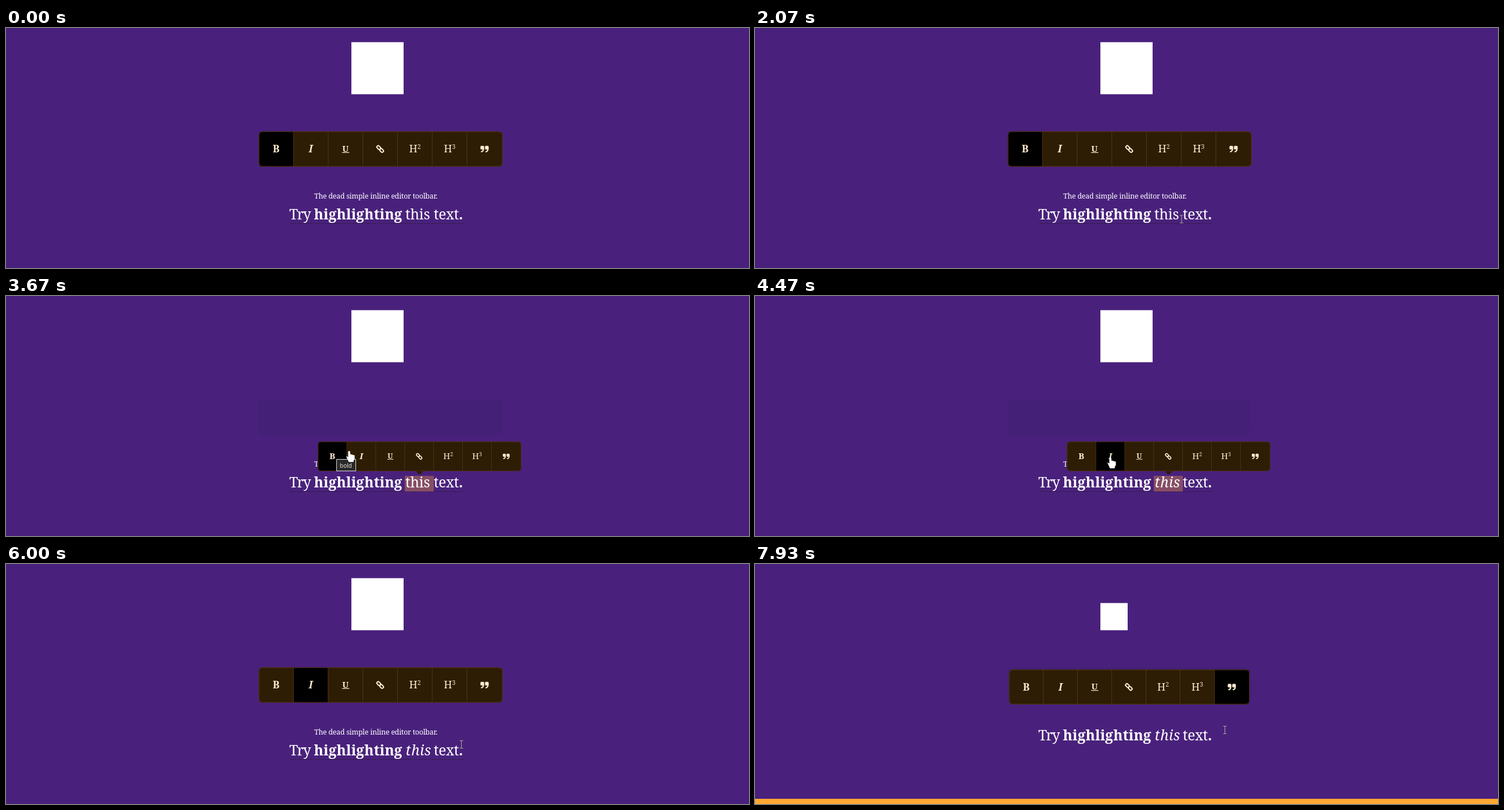
Animation of 1280 by 415 pixels, one loop 8000 ms. Source, as an HTML page with a canvas:

```html
<!DOCTYPE html>
<html lang="en">
<head>
<meta charset="utf-8">
<title>Inline editor toolbar</title>
<style>
  html, body { margin: 0; width: 100%; height: 100%; overflow: hidden; background: #49217c; }
  canvas { display: block; }
</style>
</head>
<body>
<canvas id="stage" width="1280" height="415"></canvas>
<script>
const c = document.getElementById('stage').getContext('2d');
const LOOP = 8000, STEP = 1000 / 15;
const CREAM = '#ffebcd', BAR = '#2d1d05', EDGE = '#583510', BG = '#49217c';
const SERIF = '"Noto Serif", serif';

// Moments at which something happens
const AT = {
  pickWord: 2600, italic: 4400, collapse: 5300, caretOff: 5530,
  pickLine: 6470, quote: 6950, deselect: 7600
};

const HOME = [645.5, 209.25, 1];
const OVER_WORD = [712.5, 277.25, 0.834];
const OVER_LINE = [638, 277.25, 0.834];
const OVER_QUOTE = [638, 251, 0.834];
// start, end, from, to
const MOVES = [
  [3070, 3400, HOME, OVER_WORD],
  [5500, 5830, OVER_WORD, HOME],
  [6500, 6800, HOME, OVER_LINE],
  [6950, 7080, OVER_LINE, OVER_QUOTE],
  [7640, 8050, OVER_QUOTE, HOME]
];

const MARK = [[270, 90], [1070, 50], [1930, 83], [2070, 90], [7600, 90], [7930, 47]];
const POINTER = [
  [1530, 1059, 412], [1930, 742, 335], [2400, 707, 313], [3020, 707, 313],
  [3550, 591, 269], [3950, 591, 269], [4250, 612, 280], [4650, 612, 280],
  [5200, 796.5, 320], [5600, 796.5, 320], [6000, 784.5, 312], [6450, 784.5, 312],
  [6850, 788, 278], [7200, 788, 255], [7600, 788, 255], [7900, 809.5, 287]
];

const clamp = v => Math.max(0, Math.min(1, v));
const smooth = v => v * v * (3 - 2 * v);
const easeOut = v => 1 - (1 - v) ** 2;
const mix = (a, b, p) => a.map((v, i) => v + (b[i] - v) * p);
const within = (t, a, b) => t >= a && t < b;

function follow(keys, t) {
  let i = 0;
  while (i < keys.length - 2 && t >= keys[i + 1][0]) i++;
  const [a, b] = [keys[i], keys[i + 1]];
  return mix(a, b, smooth(clamp((t - a[0]) / (b[0] - a[0])))).slice(1);
}

function text(str, x, y, font, color = '#fff', spacing = 0, align = 'left') {
  c.font = font;
  c.fillStyle = color;
  c.letterSpacing = spacing + 'px';
  c.textAlign = align;
  c.fillText(str, x, y);
}

function box(x, y, w, h, r, fill) {
  c.beginPath();
  c.roundRect(x, y, w, h, r);
  c.fillStyle = fill;
  c.fill();
}

function drawMark(t) {
  const [s] = follow(MARK, t);
  c.fillStyle = '#fff';
  c.fillRect(595, 114.5 - s, s, s);
}

function linkIcon(x) {
  c.save();
  c.translate(x, 0);
  c.rotate(Math.PI / 4);
  c.strokeStyle = CREAM;
  c.lineWidth = 2;
  for (const dx of [-7, 0]) {
    c.beginPath();
    c.roundRect(dx, -2.3, 7, 4.6, 2);
    c.stroke();
  }
  c.restore();
}

function quoteIcon(x) {
  c.strokeStyle = CREAM;
  c.lineWidth = 2.2;
  for (const dx of [x - 7, x + 0.8]) {
    box(dx, -5.5, 6.3, 6.3, 1.6, CREAM);
    c.beginPath();
    c.moveTo(dx + 5.2, -1);
    c.quadraticCurveTo(dx + 5.2, 4.6, dx + 1, 4.8);
    c.stroke();
  }
}

function heading(level, x) {
  text('H', x - 10, 6, '500 18px ' + SERIF, CREAM);
  text(level, x + 4.4, -0.5, '500 10.5px ' + SERIF, CREAM);
}

function drawBar([x, y, scale], active, arrow) {
  const cell = 59.75, left = -210, top = -30.5;
  const mid = i => left + cell * (i + 0.5);
  c.save();
  c.translate(x, y);
  c.scale(scale, scale);
  if (arrow) {
    c.fillStyle = BAR;
    c.beginPath();
    c.moveTo(-9, 30);
    c.lineTo(9, 30);
    c.lineTo(0, 38);
    c.fill();
  }
  box(left, top, 420, 61, 6, BAR);
  c.save();
  c.clip();
  c.fillStyle = '#000';
  c.fillRect(left + cell * active, top, active === 6 ? 62 : cell, 61);
  c.restore();
  c.strokeStyle = EDGE;
  c.lineWidth = 1;
  c.beginPath();
  c.roundRect(left + 0.5, top + 0.5, 419, 60, 6);
  for (let i = 1; i < 7; i++) {
    c.moveTo(left + cell * i, top);
    c.lineTo(left + cell * i, -top);
  }
  c.stroke();
  text('B', mid(0), 6, 'bold 17.5px ' + SERIF, CREAM, 0, 'center');
  text('I', mid(1), 6, 'italic bold 17.5px ' + SERIF, CREAM, 0, 'center');
  text('U', mid(2), 4.5, 'bold 15px ' + SERIF, CREAM, 0, 'center');
  c.fillRect(mid(2) - 6, 5.5, 12.5, 1.2);
  linkIcon(mid(3));
  heading('2', mid(4));
  heading('3', mid(5));
  quoteIcon(mid(6) + 0.5);
  c.restore();
}

function drawText(t) {
  const quoted = t >= AT.quote;
  const y = quoted ? 304.5 : 331;
  const size = '24.5px ' + SERIF;
  const put = (str, x, spacing, style = '') => text(str, x, y, style + size, '#fff', spacing);
  if (!quoted) {
    text('The dead simple inline editor toolbar.', 531, 294.5, '500 12.4px ' + SERIF, '#fff', -0.22);
    c.fillStyle = '#3a1c58';
    c.fillRect(488, 337.5, 300, 1.2);
  }
  c.fillStyle = '#864e64';
  if (within(t, AT.pickWord, AT.collapse)) c.fillRect(687, 311, 50, 27);
  if (within(t, AT.pickLine, AT.deselect)) c.fillRect(488, y - 20, 300, 27);
  put('Try', 488, -1.4);
  put('highlighting', 530.5, 0.1, 'bold ');
  if (t >= AT.italic) put('this', 688.5, 0.4, 'italic ');
  else put('this', 688, -0.2);
  put('text', 737, -0.4);
  put('.', 780, 0, 'bold ');
  if (within(t, AT.collapse, AT.caretOff)) c.fillRect(780, 311, 1, 27);
}

function iBeam(x, y) {
  c.strokeStyle = '#aaaa92';
  c.lineWidth = 1;
  c.beginPath();
  for (const s of [-1, 1]) {
    c.moveTo(x - 3, y + 6.5 * s);
    c.lineTo(x + 3, y + 6.5 * s);
  }
  c.moveTo(x, y - 6.5);
  c.lineTo(x, y + 6.5);
  c.stroke();
}

function arrowPointer(x, y) {
  c.fillStyle = '#fff';
  c.strokeStyle = '#000';
  c.lineWidth = 1;
  c.beginPath();
  c.moveTo(x, y);
  for (const [dx, dy] of [[0, 16], [4, 12.5], [7, 18.5], [9.5, 17.5], [6.8, 11.5], [11.5, 11.5]]) {
    c.lineTo(x + dx, y + dy);
  }
  c.closePath();
  c.fill();
  c.stroke();
}

function hand(x, y) {
  box(x - 1.6, y - 1, 3.6, 13, 1.8, '#fff');
  for (let i = 0; i < 3; i++) box(x + 1.6 + i * 2.5, y + 4.5 + i * 0.7, 3, 8, 1.4, '#fff');
  c.beginPath();
  c.moveTo(x - 5.2, y + 7.5);
  c.lineTo(x - 1, y + 10);
  c.lineTo(x + 9.4, y + 9);
  c.lineTo(x + 7.5, y + 18);
  c.lineTo(x - 0.5, y + 18);
  c.closePath();
  c.fill();
}

function drawPointer(t, [bx, by, s]) {
  if (t < POINTER[0][0]) return;
  const [x, y] = follow(POINTER, t);
  const overBar = Math.abs(x - bx) < 209 * s && Math.abs(y - by) < 30 * s;
  if (overBar) hand(x, y);
  else if (y > 345) arrowPointer(x, y);
  else iBeam(x, y);
}

function drawTip() {
  c.fillStyle = '#dcdcdc';
  c.fillRect(569, 282, 34, 21);
  c.fillStyle = '#2a2a2a';
  c.fillRect(570, 283, 32, 19);
  text('bold', 585.5, 297, '10px "Open Sans", sans-serif', '#f0e8e0', 0, 'center');
}

function barPose(t) {
  let pose = HOME;
  for (const [a, b, from, to] of MOVES) {
    if (t >= a) pose = mix(from, to, easeOut(clamp((t - a) / (b - a))));
  }
  return pose;
}

function draw(t) {
  c.fillStyle = BG;
  c.fillRect(0, 0, 1280, 415);
  if (t >= AT.quote) {
    c.fillStyle = '#ffa834';
    c.fillRect(0, 406, 1280, 9);
  }
  drawMark(t);
  box(435, 179, 420, 61, 6, '#442077');
  drawText(t);
  const pose = barPose(t);
  const active = t < AT.italic ? 0 : t < AT.quote ? 1 : 6;
  drawBar(pose, active, pose[2] < 0.84);
  if (within(t, 3600, 3950)) drawTip();
  drawPointer(t, pose);
}

function tick(now) {
  const t = now % LOOP;
  draw(Math.floor((t + 6) / STEP) * STEP % LOOP);
  requestAnimationFrame(tick);
}
requestAnimationFrame(tick);
</script>
</body>
</html>
```
